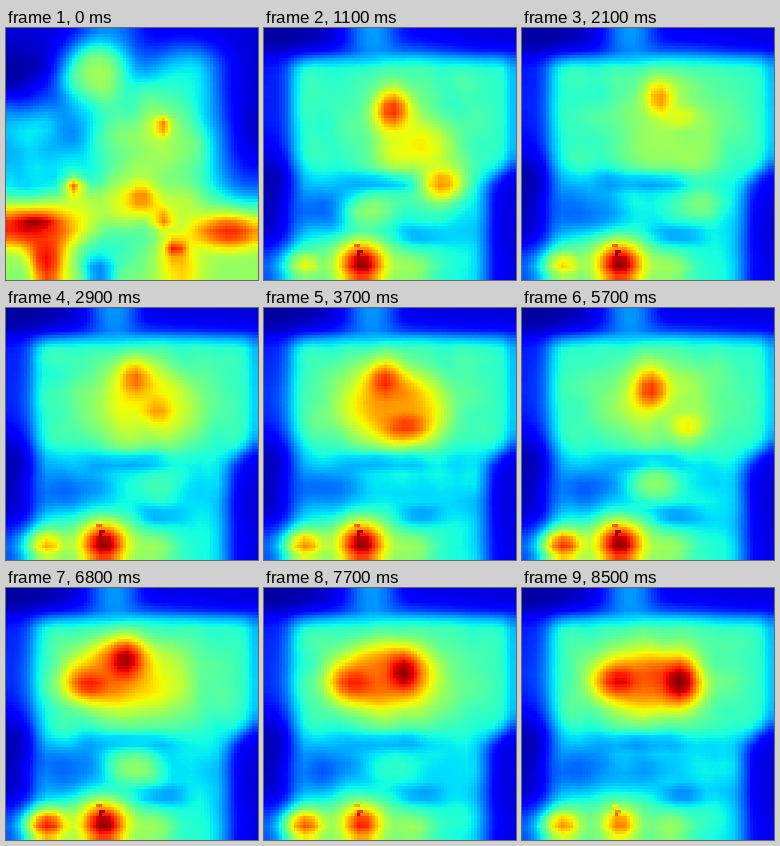
A matplotlib script for the animation above (8.6 s loop, 252 by 252 pixels).

```python
import numpy as np
import matplotlib.pyplot as plt
from matplotlib.animation import FuncAnimation

SIZE, CELLS, COARSE = 252, 84, 28
FRAMES, STEP = 86, 100
FADE = 11

# Key frames and the place (x, y) and heat of each moving part at them.
KEYS = [11, 21, 37, 57, 68, 85]
HEAD = [128, 137, 120, 129, 119, 157], [82, 71, 74, 82, 74, 94], [.87, .74, .87, .86, .98, 1]
ARM = [179, 160, 142, 165, 85, 97], [156, 88, 118, 118, 95, 93], [.75, .63, .87, .64, .88, .92]
MASS = [142, 152, 125, 138, 132, 130], [112, 103, 98, 94, 94, 92], [.5, .57, .65, .59, .65, .64]
LUMP = [105, 180, 123, 135, 128, 130], [185, 177, 181, 176, 179, 180], [.52, .5, .36, .52, .54, .28]

ticks = (np.arange(COARSE) + .5) * SIZE / COARSE
fine = (np.arange(CELLS) + .5) * SIZE / CELLS
X, Y = np.meshgrid(ticks, ticks)
ZOOM = np.array([np.interp(fine, ticks, row) for row in np.eye(COARSE)]).T

rng = np.random.default_rng(4)
WAVES = list(zip(rng.uniform(0, np.pi, 10), rng.uniform(26, 60, 10),
                 rng.uniform(0, 2 * np.pi, 10), rng.uniform(-.3, .3, 10)))
SPARKS = .13 * (rng.random((4, 3)) > .5)


def rise(v, soft):
    return .5 + .5 * np.tanh(v / (2 * soft))


def pull(field, x, y, rx, ry, level):
    """Draw the field towards a level inside a soft ellipse."""
    d2 = ((X - x) / rx) ** 2 + ((Y - y) / ry) ** 2
    field += (level - field) * np.exp(-d2 ** 1.25)


def at(track, n):
    return [np.interp(n, KEYS, values) for values in track]


def ripple(n):
    total = 0
    for turn, length, phase, speed in WAVES:
        path = X * np.cos(turn) + Y * np.sin(turn)
        total = total + np.sin(2 * np.pi * path / length + phase + speed * n)
    return total / len(WAVES)


def opening():
    f = .08 + .25 * rise(Y - 72, 8) + .2 * rise(Y - 170, 6)
    pull(f, 105, 0, 30, 30, .22)
    pull(f, 5, 40, 45, 26, .04)
    pull(f, 185, 50, 38, 32, .35)
    pull(f, 242, 100, 42, 66, .05)
    pull(f, 75, 100, 26, 24, .24)
    for grow, level in (1.4, .43), (1, .55):
        pull(f, 91, 46, 26 * grow, 25 * grow, level)
        pull(f, 148, 120, 46 * grow, 55 * grow, level)
    pull(f, 120, 178, 75, 22, .62)
    for x, y, r in (157, 98, 8), (68, 159, 9), (135, 171, 14), (157, 192, 10):
        pull(f, x, y, r, r, .78)
    pull(f, 105, 220, 34, 27, .4)
    pull(f, 93, 243, 17, 14, .27)
    pull(f, 173, 238, 21, 28, .7)
    pull(f, 170, 220, 9, 8, .88)
    pull(f, 20, 201, 52, 20, .9)
    pull(f, 41, 230, 18, 34, .9)
    pull(f, 31, 195, 15, 7, .98)
    pull(f, 222, 204, 38, 17, .87)
    pull(f, 4, 242, 18, 17, .5)
    return f + .07 * ripple(0) * rise(210 - X, 8) * rise(Y - 40, 8)


def backdrop():
    right = 236 - 14 * np.tanh((Y - 145) / 12)
    inside = rise(X - 28, 5) * rise(right - X, 5) * rise(Y - 30, 4)
    f = .08 + .27 * inside + .07 * rise(Y - 24, 4) * rise(140 - Y, 6)
    pull(f, 10, 5, 55, 22, .03)
    pull(f, 108, 5, 25, 28, .27)
    pull(f, 5, 165, 24, 45, .04)
    pull(f, 62, 180, 38, 24, .22)
    pull(f, 155, 208, 24, 9, .24)
    return f


def spot(f, x, y, rx, ry, level):
    pull(f, x, y, 1.7 * rx, 1.7 * ry, level - .14)
    pull(f, x, y, rx, ry, level)


def body(f, n):
    hx, hy, hot = at(HEAD, n)
    ax, ay, warm = at(ARM, n)
    mx, my, mild = at(MASS, n)
    rx, ry = np.interp(n, [11, 30], [44, 62]), np.interp(n, [11, 30], [58, 42])
    pull(f, mx, my, 1.4 * rx, 1.35 * ry, .41)
    pull(f, mx, my, rx, ry, mild)
    lx, ly, level = at(LUMP, n)
    pull(f, 120, 155, 55, 10, .29)
    pull(f, lx, ly, 25, 17, level)
    pull(f, (hx + ax) / 2, (hy + ay) / 2, 38, 26, min(hot, warm) - .1)
    spot(f, ax, ay, 16, 12, warm)
    spot(f, hx, hy, 12, 14, hot)


def floor(f, n):
    left = np.interp(n, [11, 57, 68, 85], [.64, .86, .89, .76])
    main = np.interp(n, [68, 85], [1, .79])
    pull(f, 95, 240, 90, 27, .47)
    pull(f, 148, 240, 20, 14, .54)
    pull(f, 42, 237, 23, 17, left - .17)
    pull(f, 42, 237, 13, 10, left)
    for grow, drop in (3, .33), (2, .12), (1.1, 0):
        pull(f, 98, 236, 10 * grow, 9 * grow, main - drop)


START = opening()


def heat(n):
    f = backdrop()
    body(f, n)
    f += .05 * ripple(n) * rise(X - 30, 6) * rise(225 - X, 6) * rise(Y - 35, 5)
    floor(f, n)
    u = np.sqrt(min(n / FADE, 1))
    u = u * u * (3 - 2 * u)
    f = ZOOM @ (START + (f - START) * u) @ ZOOM.T
    f[72:76, 30:33] += SPARKS * u
    return f


fig = plt.figure(figsize=(SIZE / 100, SIZE / 100), dpi=100)
ax = fig.add_axes([0, 0, 1, 1])
ax.axis("off")
image = ax.imshow(heat(0), cmap="jet", vmin=0, vmax=1,
                  interpolation="nearest", aspect="auto")


def update(n):
    image.set_data(heat(n))
    return [image]


anim = FuncAnimation(fig, update, frames=FRAMES, interval=STEP,
                     repeat=True, repeat_delay=0, blit=False)
plt.show()
```
